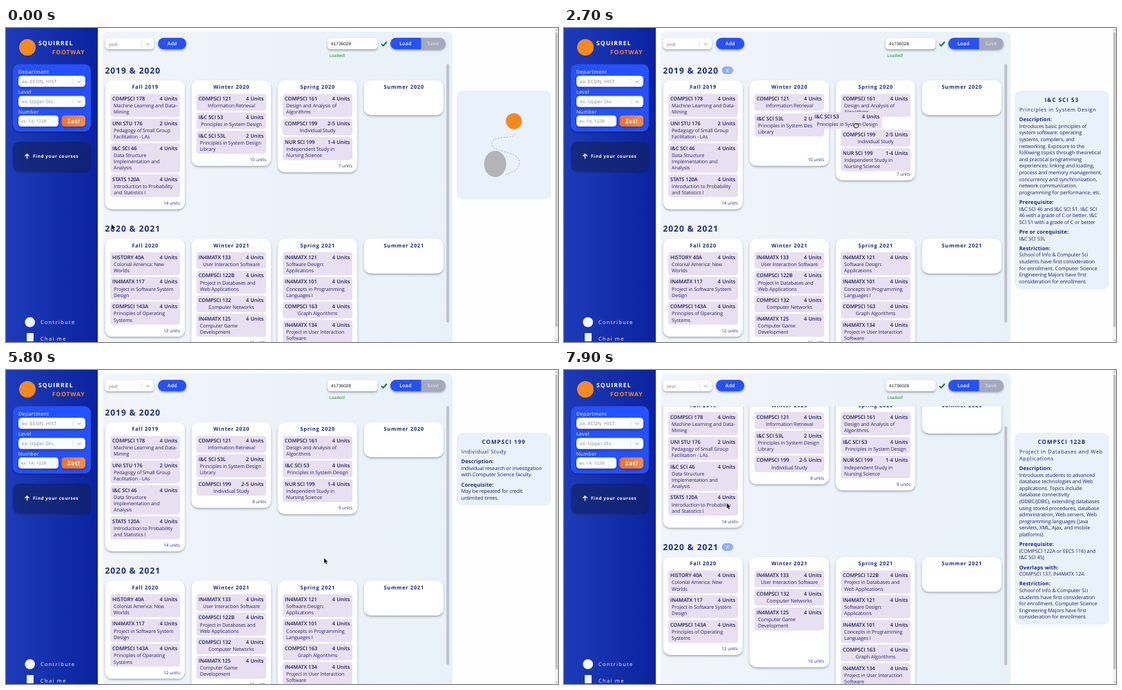
An HTML page with a canvas that plays this animation: 800 px wide and 455 px high, repeating every 8 s.

```html
<!DOCTYPE html>
<html lang="en">
<head>
<meta charset="utf-8">
<title>Course planner</title>
<style>
  html, body { margin: 0; width: 100%; height: 100%; overflow: hidden; background: #fefefe; }
  canvas { display: block; width: 800px; height: 455px; }
</style>
</head>
<body>
<canvas id="stage"></canvas>
<script>
const LOOP = 8000, DROP_TIME = 330;
const SANS = '"Open Sans", "Noto Sans", sans-serif';
const NAVY = '#1b2b80', INK = '#171f5c', BLUE = '#2551fc', ORANGE = '#f58a1f';
const canvas = document.getElementById('stage');
const ctx = canvas.getContext('2d');
const ratio = window.devicePixelRatio || 1;
canvas.width = 800 * ratio;
canvas.height = 455 * ratio;

const course = (code, units, ...lines) => ({ code, units, lines });
const C = {
  cs178: course('COMPSCI 178', '4', 'Machine Learning and Data-', 'Mining'),
  uni176: course('UNI STU 176', '2', 'Pedagogy of Small Group', 'Facilitation - LAs'),
  ics46: course('I&C SCI 46', '4', 'Data Structure', 'Implementation and', 'Analysis'),
  stats: course('STATS 120A', '4', 'Introduction to Probability', 'and Statistics I'),
  cs121: course('COMPSCI 121', '4', 'Information Retrieval'),
  ics53: course('I&C SCI 53', '4', 'Principles in System Design'),
  ics53L: course('I&C SCI 53L', '2', 'Principles in System Design', 'Library'),
  cs161: course('COMPSCI 161', '4', 'Design and Analysis of', 'Algorithms'),
  cs199: course('COMPSCI 199', '2-5', 'Individual Study'),
  nur199: course('NUR SCI 199', '1-4', 'Independent Study in', 'Nursing Science'),
  hist: course('HISTORY 40A', '4', 'Colonial America: New', 'Worlds'),
  in117: course('IN4MATX 117', '4', 'Project in Software System', 'Design'),
  cs143: course('COMPSCI 143A', '4', 'Principles of Operating', 'Systems'),
  in133: course('IN4MATX 133', '4', 'User Interaction Software'),
  cs122: course('COMPSCI 122B', '4', 'Project in Databases and', 'Web Applications'),
  cs132: course('COMPSCI 132', '4', 'Computer Networks'),
  in125: course('IN4MATX 125', '4', 'Computer Game', 'Development'),
  in121: course('IN4MATX 121', '4', 'Software Design:', 'Applications'),
  in101: course('IN4MATX 101', '4', 'Concepts in Programming', 'Languages I'),
  cs163: course('COMPSCI 163', '4', 'Graph Algorithms'),
  in134: course('IN4MATX 134', '4', 'Project in User Interaction', 'Software')
};
const PLAN = [
  [C.cs178, C.uni176, C.ics46, C.stats], [C.cs121, C.ics53, C.ics53L], [C.cs161, C.cs199, C.nur199], [],
  [C.hist, C.in117, C.cs143], [C.in133, C.cs122, C.cs132, C.in125], [C.in121, C.in101, C.cs163, C.in134], []
];
const TERMS = ['Fall 2019', 'Winter 2020', 'Spring 2020', 'Summer 2020',
  'Fall 2020', 'Winter 2021', 'Spring 2021', 'Summer 2021'];

// leave: the old column closes up; enter: the new column makes room
const MOVES = [
  { item: C.ics53, from: 1, to: 2, at: 1, press: 2300, leave: 2600, enter: 2660, drop: 3080 },
  { item: C.cs199, from: 2, to: 1, at: 2, press: 4250, leave: 4420, enter: 4560, drop: 5000 },
  { item: C.cs122, from: 5, to: 6, at: 0, press: 6780, leave: 6950, enter: 7130, drop: 7620 }
];
const HOVERS = [
  [C.ics46, 800, 1450], [C.ics53L, 1850, 2100], [C.ics53, 2100, 2300],
  [C.ics53, 3400, 3750], [C.cs199, 3750, 4250], [C.cs199, 5330, 5420]
];
const CURSOR = [
  [0, 153, 284.5], [900, 205, 188], [1300, 212, 190], [1850, 300, 156], [2000, 309, 149.5],
  [2250, 339, 139], [2350, 339, 139], [2700, 423, 138.5], [2900, 457, 152], [3120, 457, 152],
  [4000, 451, 167.5], [4150, 448, 171], [4300, 448, 171], [4800, 335, 178], [5050, 335, 178],
  [5700, 461, 272.5], [6000, 461, 272.5], [6500, 343.5, 310], [6700, 338, 327], [6820, 338, 327],
  [7500, 450, 322], [7640, 450, 322], [7900, 236, 193], [8000, 236, 193]
];

const ENROLL = ['Restriction:', 'School of Info & Computer Sci', 'students have first consideration',
  'for enrollment. Computer Science', 'Engineering Majors have first', 'consideration for enrollment.'];
const INFO = [
  { from: 1200, title: 'I&C SCI 46', sub: ['Data Structure', 'Implementation and Analysis'], parts: [
    ['Description:', 'Focuses on implementation and', 'mathematical analysis of', 'fundamental data structures and',
      'algorithms. Covers storage', 'allocation and memory', 'management techniques.'],
    ['Prerequisite:', 'CSE 45C or I&C SCI 45C. CSE 45C', 'with a grade of C or better. I&C SCI', '45C with a grade of C or better'],
    ENROLL] },
  { from: 2300, title: 'I&C SCI 53', sub: ['Principles in System Design'], parts: [
    ['Description:', 'Introduces basic principles of', 'system software: operating', 'systems, compilers, and',
      'networking. Exposure to the', 'following topics through theoretical', 'and practical programming',
      'experiences: linking and loading,', 'process and memory management,', 'concurrency and synchronization,',
      'network communication,', 'programming for performance, etc.'],
    ['Prerequisite:', 'I&C SCI 46 and I&C SCI 51. I&C SCI', '46 with a grade of C or better. I&C', 'SCI 51 with a grade of C or better'],
    ['Pre or corequisite:', 'I&C SCI 53L'], ENROLL] },
  { from: 4250, title: 'COMPSCI 199', sub: ['Individual Study'], parts: [
    ['Description:', 'Individual research or investigation', 'with Computer Science faculty.'],
    ['Corequisite:', 'May be repeated for credit', 'unlimited times.']] },
  { from: 6780, title: 'COMPSCI 122B', sub: ['Project in Databases and Web', 'Applications'], parts: [
    ['Description:', 'Introduces students to advanced', 'database technologies and Web', 'applications. Topics include',
      'database connectivity', '(ODBC/JDBC), extending databases', 'using stored procedures, database',
      'administration, Web servers, Web', 'programming languages (Java', 'servlets, XML, Ajax, and mobile', 'platforms).'],
    ['Prerequisite:', '(COMPSCI 122A or EECS 116) and', 'I&C SCI 45J'],
    ['Overlaps with:', 'COMPSCI 137, IN4MATX 124.'], ENROLL] }
];

const clamp = v => Math.max(0, Math.min(1, v));
const smooth = v => { v = clamp(v); return v * v * (3 - 2 * v); };
const snap = v => 1 - (1 - clamp(v)) ** 4;
const shiftAt = (t, start) => snap((t - start) / 200);

// y is the middle of the capitals
function text(str, x, y, { size = 7.4, weight = 400, color = INK, gap = 0, align = 'left', family = SANS } = {}) {
  ctx.font = `${weight} ${size}px ${family}`;
  ctx.letterSpacing = gap + 'px';
  ctx.textAlign = align;
  ctx.fillStyle = color;
  ctx.fillText(str, x, y + size * 0.36);
}

function box(x, y, w, h, r, fill, shadow) {
  ctx.save();
  if (shadow) {
    ctx.shadowColor = `rgba(0, 0, 0, ${shadow})`;
    ctx.shadowBlur = 3 * ratio;
    ctx.shadowOffsetY = 1.7 * ratio;
  }
  ctx.fillStyle = fill;
  ctx.beginPath();
  ctx.roundRect(x, y, w, h, r);
  ctx.fill();
  ctx.restore();
}

function line(points, color, width) {
  ctx.beginPath();
  points.forEach(([x, y]) => ctx.lineTo(x, y));
  ctx.strokeStyle = color;
  ctx.lineWidth = width;
  ctx.stroke();
}

function disc(x, y, r, color) {
  ctx.fillStyle = color;
  ctx.beginPath();
  ctx.arc(x, y, r, 0, 7);
  ctx.fill();
}

function across(x0, x1, a, b) {
  const g = ctx.createLinearGradient(x0, 0, x1, 0);
  g.addColorStop(0, a);
  g.addColorStop(1, b);
  return g;
}

function select(x, y, w, hint, gap) {
  box(x, y, w, 16, 4.5, '#fff', 0.3);
  text(hint, x + 5, y + 8.5, { size: 6.9, color: '#808080', gap });
  const right = x + w;
  line([[right - 18, y + 3.5], [right - 18, y + 12.5]], '#ccc', 0.6);
  line([[right - 11.5, y + 7], [right - 9, y + 9.5], [right - 6.5, y + 7]], '#b8b8b8', 1.2);
}

function sidebar() {
  ctx.fillStyle = across(0, 133, '#1d3cb9', '#0b229e');
  ctx.fillRect(0, 0, 133, 455);
  disc(31, 28, 12, ORANGE);
  text('SQUIRREL', 47, 21.7, { size: 8.6, weight: 700, color: '#fff', gap: 1.1 });
  text('FOOTWAY', 67, 34.7, { size: 8.6, weight: 700, color: ORANGE, gap: 0.8 });

  box(10, 52.5, 113, 97.5, 9, BLUE, 0.25);
  const label = { size: 7, color: '#fff', gap: 0.45 };
  text('Department', 18, 63.2, label);
  select(18, 69.3, 97, 'ex. ECON, HIST', 0.2);
  text('Level', 18, 92.2, label);
  select(18, 98.5, 97, 'ex. Upper Div.', 0.2);
  text('Number', 18, 121.2, label);
  box(18, 126.8, 58, 16, 4.5, '#fff', 0.3);
  text('ex. 1A, 122B', 22, 135, { size: 6.1, color: '#808080', gap: 0.2 });
  box(80.5, 126.8, 34.5, 16, 4.5, across(80, 115, '#f0702c', '#f68d4c'), 0.3);
  text('Zot!', 98, 134.8, { size: 8.4, weight: 700, color: '#fff', gap: 0.55, align: 'center' });

  box(10, 164.7, 113, 42.5, 9, across(10, 123, '#14297f', '#0f2276'), 0.25);
  line([[30.5, 189.5], [30.5, 183]], '#fff', 1.3);
  line([[27.4, 185.8], [30.5, 182.7], [33.6, 185.8]], '#fff', 1.3);
  text('Find your courses', 39, 185.8, { size: 6.4, weight: 700, color: '#fff', gap: 0.6 });

  const link = { size: 7.5, color: '#fff', gap: 1.3 };
  disc(34.7, 426.3, 7.3, '#f4f6ff');
  text('Contribute', 50, 426.4, link);
  box(30, 442, 10, 12, 1, '#eef1ff');
  text('Chai me', 50, 450.6, link);
}

function toolbar() {
  select(143.7, 14.8, 70.5, 'year', 0);
  box(220.3, 14.3, 41, 16.5, 8.2, BLUE, 0.35);
  const label = { size: 7, weight: 600, color: '#fff', gap: 0.25, align: 'center' };
  text('Add', 240.8, 22.7, label);
  box(466, 14.8, 72.5, 16, 4.5, '#fff', 0.35);
  text('41736028', 471, 22.8, { size: 6.4, color: '#111', gap: 0.08, family: '"Liberation Sans", sans-serif' });
  line([[544, 23.1], [546.7, 25.8], [551.8, 20]], '#087a1c', 1.9);
  text('Loaded!', 468.5, 40.1, { size: 6.1, color: '#12812a' });
  box(557, 14.3, 80, 16.5, 8.2, '#a5a9be', 0.35);
  box(557, 14.3, 44.5, 16.5, [8.2, 0, 0, 8.2], BLUE);
  text('Load', 579, 22.7, label);
  text('Save', 619, 22.7, { ...label, color: '#dadce6' });
}

const slotHeight = item => 17.75 + 9.05 * item.lines.length;
const stackHeight = items => items.reduce((sum, item) => sum + slotHeight(item), 0);
const columnX = i => 143.7 + 125 * (i % 4);
const columnY = i => i < 4 ? 75.8 : 305.2;

function hoverAmount(item, t) {
  return Math.max(0, ...HOVERS.map(([who, start, end]) =>
    who === item ? clamp((t - start) / 250) * clamp(1 - (t - end) / 150) : 0));
}

function drawItem(item, x, y, hover = 0) {
  ctx.save();
  ctx.globalAlpha = 1 - 0.52 * hover;
  box(x, y, 101, slotHeight(item) - 2.5, 4, '#e8dff1');
  text(item.code, x + 3, y + 7, { size: 7.5, weight: 600, gap: -0.08 });
  text(item.units + ' Units', x + 97.5, y + 7, { size: 7.5, weight: 600, gap: 0.08, align: 'right' });
  const single = item.lines.length === 1;
  item.lines.forEach((str, i) => text(str, x + (single ? 50.5 : 5), y + 17.4 + 9.05 * i,
    { size: 7.2, gap: -0.1, color: '#23286a', align: single ? 'center' : 'left' }));
  if (hover) {
    ctx.globalAlpha = 0.68 * hover;
    box(x + 82, y + 1.8, 15, 9.5, 4.5, '#d67a58');
    text('X', x + 89.5, y + 6.6, { size: 5.5, color: '#fff', align: 'center' });
  }
  ctx.restore();
}

function drawColumn(i, items, t, move) {
  const x = columnX(i), top = columnY(i);
  const size = move ? slotHeight(move.item) : 0;
  const closing = move && move.from === i ? shiftAt(t, move.leave) : 0;
  const opening = move && move.to === i ? shiftAt(t, move.enter) : 0;
  const end = top + 19.6 + stackHeight(items) + size * opening ** 1.6;

  box(x, top, 115.5, Math.max(50.5, end + 15 - top), 10, '#fff', 0.3);
  text(TERMS[i], x + 58, top + 9.8, { size: 7.6, weight: 700, color: NAVY, gap: 0.65, align: 'center' });
  if (!items.length) return;
  const units = items.reduce((sum, item) => sum + parseInt(item.units), 0);
  text(units + ' units', x + 108.3, end + 6, { size: 6.4, color: '#232c78', align: 'right' });

  let y = top + 19.6, passed = false;
  items.forEach((item, k) => {
    if (move && item === move.item) passed = true;
    else {
      const shift = size * ((k >= (move ? move.at : 0) ? opening : 0) - (passed ? closing : 0));
      drawItem(item, x + 7.4, y + shift, hoverAmount(item, t));
    }
    y += slotHeight(item);
  });
}

function drawDragged(plan, t, move) {
  const slotY = (col, index) => columnY(col) + 19.6 + stackHeight(plan[col].slice(0, index));
  const x = columnX(move.from), y = slotY(move.from, plan[move.from].indexOf(move.item));
  const [px, py] = cursorAt(move.press), [cx, cy] = cursorAt(Math.min(t, move.drop));
  const k = snap((t - move.drop) / (DROP_TIME * 0.8));
  const dx = (cx - px) * (1 - k) + (columnX(move.to) - x) * k;
  const dy = (cy - py) * (1 - k) + (slotY(move.to, move.at) - y) * k;
  drawItem(move.item, x + 7.4 + dx, y + dy);
}

function yearTitle(str, y, shown) {
  text(str, 143.5, y, { size: 12, weight: 700, color: NAVY, gap: 0.95 });
  if (!shown) return;
  ctx.save();
  ctx.globalAlpha = shown;
  box(228.7, y - 5.5, 16.5, 11, 5.5, '#92b0f0');
  text('X', 237, y, { size: 6.4, weight: 600, color: '#fff', align: 'center' });
  ctx.restore();
}

function planner(t) {
  box(140, 5, 507, 460, 8, across(140, 647, '#f1f4fb', '#e8f1f9'));
  toolbar();
  const plan = PLAN.map(items => items.slice());
  let active = null;
  for (const move of MOVES) {
    if (t >= move.drop + DROP_TIME && move.drop + DROP_TIME < 7900) {
      plan[move.from].splice(plan[move.from].indexOf(move.item), 1);
      plan[move.to].splice(move.at, 0, move.item);
    } else if (t >= move.press) active = move;
  }
  const scroll = 34.3 * smooth((t - 5950) / 350);
  ctx.save();
  ctx.beginPath();
  ctx.rect(134, 52.3, 513, 403);
  ctx.clip();
  ctx.translate(0, -scroll);
  yearTitle('2019 & 2020', 61.3, clamp((t - 150) / 200) * clamp((5700 - t) / 150));
  yearTitle('2020 & 2021', 290.7, clamp((t - 6300) / 250));
  plan.forEach((items, i) => drawColumn(i, items, t, active));
  if (active) drawDragged(plan, t, active);
  ctx.restore();

  const grown = shiftAt(t, MOVES[2].enter);
  const top = 52 + scroll * (0.93 - 0.06 * grown);
  box(638.3, top, 4, Math.min(375 - 29 * grown, 455 - top), 2, '#bfc1c9');
}

function illustration() {
  box(653, 91, 137, 157.5, 9, '#e9f1fa');
  ctx.save();
  ctx.setLineDash([2.2, 2]);
  ctx.lineWidth = 1;
  ctx.strokeStyle = '#b3b3c4';
  ctx.beginPath();
  ctx.moveTo(738, 153);
  ctx.bezierCurveTo(738, 162, 706, 154, 704, 167);
  ctx.bezierCurveTo(703, 181, 742, 178, 744, 193);
  ctx.bezierCurveTo(745, 204, 734, 210, 724, 212);
  ctx.stroke();
  ctx.restore();
  disc(736, 135, 11.5, ORANGE);
  ctx.fillStyle = '#b2b4b8';
  ctx.beginPath();
  ctx.ellipse(709, 197, 16, 19, 0, 0, 7);
  ctx.fill();
}

function infoPanel(t) {
  const info = INFO.filter(entry => t >= entry.from).pop();
  if (!info) return illustration();
  const lines = info.parts.flat().length;
  const bottom = 129.5 + 9.8 * (info.sub.length - 1) + 9.6 * lines + 4.6 * info.parts.length;
  box(653, 91, 137, bottom - 91, 9, '#e9f1fa');
  text(info.title, 721.5, 103.8, { size: 8.1, weight: 700, color: NAVY, gap: 1, align: 'center' });
  let y = 118.4;
  info.sub.forEach((str, i) => text(str, 660, y + 9.8 * i, { size: 7.5, gap: 0.6, color: '#1f2568' }));
  y += 9.8 * (info.sub.length - 1);
  for (const [heading, ...body] of info.parts) {
    y += 14;
    text(heading, 659.7, y, { size: 7.6, weight: 700, color: NAVY, gap: 0.13 });
    y += 0.2;
    for (const str of body) text(str, 659.7, y += 9.6, { gap: -0.1, color: '#1f2568' });
  }
}

function pageScrollbar() {
  ctx.fillStyle = '#f1f1f1';
  ctx.fillRect(795.5, 0, 4.5, 455);
  ctx.fillStyle = '#bdbdbd';
  ctx.fillRect(796.3, 6.5, 3, 427);
  line([[796.6, 3.8], [798, 2.2], [799.4, 3.8]], '#777', 0.8);
  line([[796.6, 451.5], [798, 453], [799.4, 451.5]], '#777', 0.8);
}

function cursorAt(t) {
  const i = Math.max(1, CURSOR.findIndex(([time]) => time >= t));
  const [t0, x0, y0] = CURSOR[i - 1], [t1, x1, y1] = CURSOR[i];
  const k = smooth((t - t0) / (t1 - t0));
  return [x0 + (x1 - x0) * k, y0 + (y1 - y0) * k];
}

function pointer(t) {
  const [x, y] = cursorAt(t);
  const grabbing = MOVES.some(move => t >= move.press && t < move.drop);
  ctx.save();
  ctx.translate(x, y);
  ctx.lineJoin = 'round';
  if (grabbing) {
    ctx.beginPath();
    ctx.roundRect(-2.6, 0, 5.8, 6, [2, 2, 1.5, 1.5]);
    ctx.fillStyle = '#fff';
    ctx.strokeStyle = '#111';
    ctx.lineWidth = 0.9;
    ctx.fill();
    ctx.stroke();
    for (const fx of [-0.9, 0.5, 1.9]) line([[fx, 0.3], [fx, 2.2]], '#111', 0.5);
  } else {
    ctx.beginPath();
    [[0, 0], [0, 7.6], [1.7, 6.1], [2.9, 8.8], [4.2, 8.2], [3, 5.6], [5.3, 5.4]]
      .forEach(([px, py]) => ctx.lineTo(px, py));
    ctx.closePath();
    ctx.strokeStyle = '#fff';
    ctx.lineWidth = 1;
    ctx.stroke();
    ctx.fillStyle = '#111';
    ctx.fill();
  }
  ctx.restore();
}

function draw(now) {
  const t = now % LOOP;
  ctx.setTransform(ratio, 0, 0, ratio, 0, 0);
  ctx.textRendering = 'geometricPrecision';
  ctx.fillStyle = '#fefefe';
  ctx.fillRect(0, 0, 800, 455);
  sidebar();
  planner(t);
  infoPanel(t);
  pageScrollbar();
  pointer(t);
}

const start = performance.now();
function tick() {
  draw(performance.now() - start);
  requestAnimationFrame(tick);
}
tick();
</script>
</body>
</html>
```
